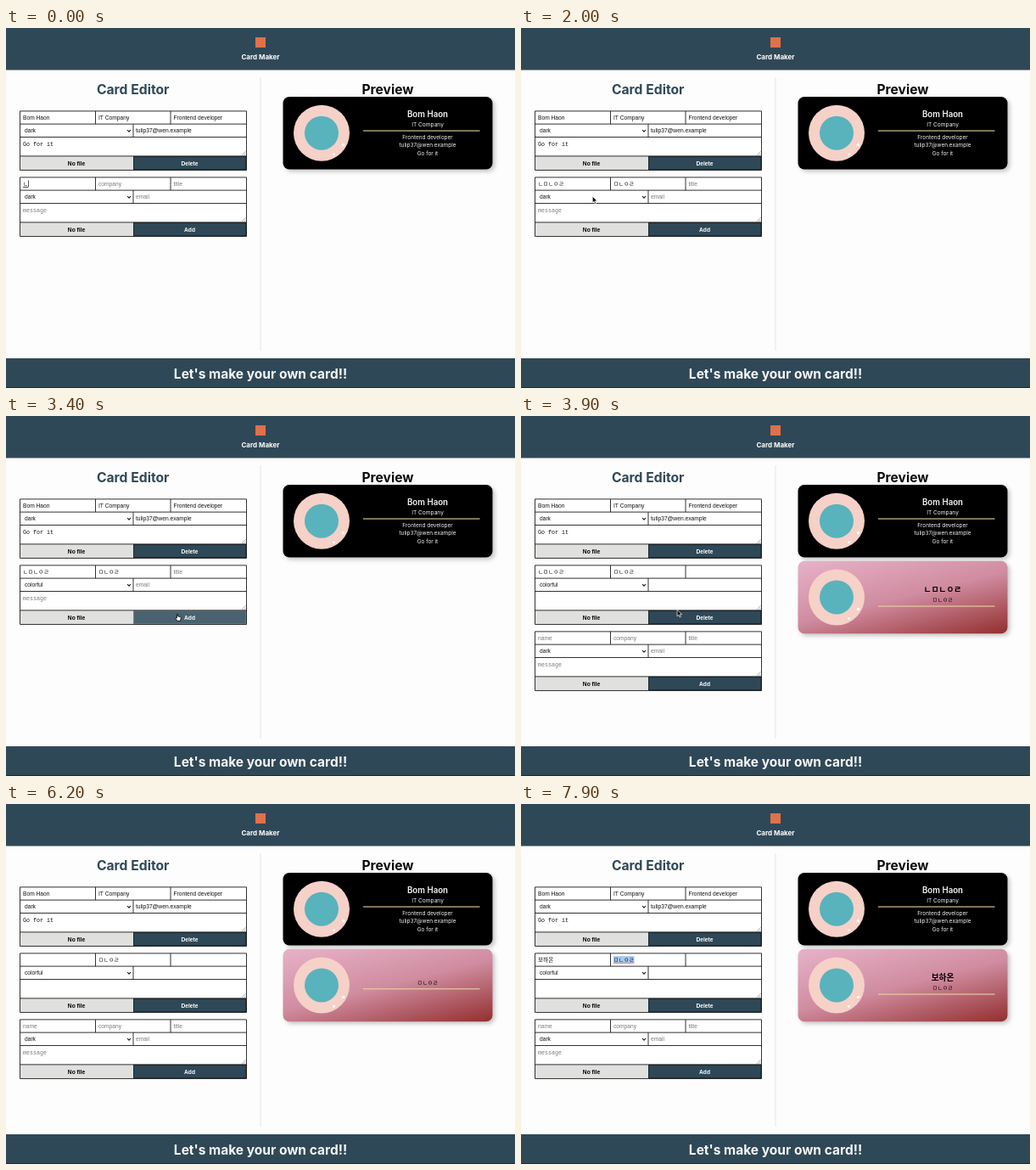
Recreate the animation shown at these times as an HTML page with a canvas. Size 600 px wide and 424 px high, loop 8 s.

```html
<!DOCTYPE html>
<html lang="en">
<head>
<meta charset="utf-8">
<title>Card Maker</title>
<style>
  html, body { margin: 0; width: 100%; height: 100%; overflow: hidden; background: #fdfdfd; }
  canvas { display: block; width: 600px; height: 424px; }
</style>
</head>
<body>
<canvas id="stage"></canvas>
<script>
const W = 600, H = 424, LOOP = 8000, STEP = 100;
const canvas = document.getElementById('stage');
const ctx = canvas.getContext('2d');
const dpr = window.devicePixelRatio || 1;
canvas.width = W * dpr;
canvas.height = H * dpr;

const NAVY = '#2f4857', INK = '#111', GOLD = '#e8d3a2', HINT = '#7a7a7a';
const UI = '"Inter", "Noto Sans CJK KR", "Noto Sans CJK", sans-serif';
const FIELD = '"Liberation Sans", "Noto Sans CJK KR", "Noto Sans CJK", sans-serif';
const MONO = '"Liberation Mono", monospace';
const FS = 6.67;
const FORM_TOP = 97.9, FORM_GAP = 78;

const OWNER = {
  name: 'Bom Haon', company: 'IT Company', title: 'Frontend developer',
  email: 'tulip37@wen.example', message: 'Go for it', theme: 'dark'
};
const HINTS = { name: 'name', company: 'company', title: 'title', email: 'email', message: 'message' };
const NAME = 'ㄴㅁㄴㅇㄹ', COMPANY = 'ㅁㄴㅇㄹ';

// Typing script: time, name, company, focused field, composing
const typing = [];
const type = (t, name, company, focus, ime) => typing.push({ t, name, company, focus, ime });
[0, 100, 300, 500, 700].forEach((t, i) => type(t, NAME.slice(0, i + 1), '', 'name', true));
type(1000, NAME, '', 'company', false);
[1200, 1400, 1500, 1700].forEach((t, i) => type(t, NAME, COMPANY.slice(0, i + 1), 'company', true));
type(1900, NAME, COMPANY, '', false);
type(4600, NAME, COMPANY, 'name', false);
[5000, 5200, 5400, 5500, 5600].forEach((t, i) => type(t, NAME.slice(0, 4 - i), COMPANY, 'name', false));
['ㅂ', '보', '봏', '보하', '보항', '보하오', '보하온'].forEach((s, i) =>
  type([6400, 6500, 6700, 6900, 7100, 7300, 7500][i], s, COMPANY, 'name', true));
type(7700, '보하온', COMPANY, 'select', false);

const MENU_OPEN = 2100, MENU_CLOSE = 2800, ADDED = 3600;

// Pointer path: [time, x, y]
const path = [
  [1900, 84, 198], [2200, 85, 199], [2600, 88.5, 221], [2900, 88.5, 221],
  [3300, 203, 237], [3700, 203, 237], [4500, 82, 181], [5000, 82, 181]
];

function pointer(t) {
  if (t < path[0][0] || t >= path[path.length - 1][0]) return null;
  const i = path.findIndex(p => p[0] > t);
  const a = path[i - 1], b = path[i];
  const k = (t - a[0]) / (b[0] - a[0]), e = k * k * (3 - 2 * k);
  return { x: a[1] + (b[1] - a[1]) * e, y: a[2] + (b[2] - a[2]) * e };
}

function rect(x, y, w, h, color) {
  ctx.fillStyle = color;
  ctx.fillRect(x, y, w, h);
}

function round(x, y, w, h, r, fill) {
  ctx.beginPath();
  ctx.roundRect(x, y, w, h, r);
  ctx.fillStyle = fill;
  ctx.fill();
}

function disc(x, y, r, color) {
  ctx.beginPath();
  ctx.arc(x, y, r, 0, 7);
  ctx.fillStyle = color;
  ctx.fill();
}

// y is the middle of the capital letters
function text(s, x, y, size, color, family = UI, weight = 400, align = 'left') {
  ctx.font = `${weight} ${size}px ${family}`;
  ctx.textAlign = align;
  ctx.fillStyle = color;
  ctx.fillText(s, x, y + size * 0.36);
}

function poly(points, fill, stroke, width = 0.8, closed = true) {
  ctx.beginPath();
  points.forEach(([x, y]) => ctx.lineTo(x, y));
  if (closed) ctx.closePath();
  if (fill) { ctx.fillStyle = fill; ctx.fill(); }
  if (stroke) { ctx.strokeStyle = stroke; ctx.lineWidth = width; ctx.stroke(); }
}

function shadow(color, blur, dx, dy) {
  ctx.shadowColor = color;
  ctx.shadowBlur = blur * dpr;
  ctx.shadowOffsetX = dx * dpr;
  ctx.shadowOffsetY = dy * dpr;
}

function page() {
  rect(0, 0, W, H, '#fdfdfd');
  rect(0, 0, W, 49.5, NAVY);
  rect(0, 389, W, 35, NAVY);
  rect(0, 423, W, 1, '#1d2c35');
  rect(294, 11, 12, 12, '#e0714a');
  text('Card Maker', 300, 34, 8, '#fff', UI, 700, 'center');
  text('Card Editor', 149.7, 72, 15.7, NAVY, UI, 700, 'center');
  text('Preview', 450, 72, 15.6, '#0a0a0a', UI, 700, 'center');
  text("Let's make your own card!!", 300, 407.5, 15.5, '#f7f7f7', UI, 700, 'center');
  rect(299.5, 58, 1, 322, '#e6e6e6');
}

function editMarks(value, x, y, edit) {
  ctx.font = `${FS}px ${FIELD}`;
  const full = ctx.measureText(value).width;
  if (edit.ime) {
    const before = ctx.measureText(value.slice(0, -1)).width;
    rect(x + before, y + 3.6, full - before, 0.8, INK);
  }
  if (edit.caret) rect(x + full, y - 4, 0.7, 8, INK);
}

function form(index, data, label, hover, edit) {
  const L = 16.5, R = 283.5, top = FORM_TOP + index * FORM_GAP;
  const rows = [0, 15.2, 30.6, 53, 69.5];
  const line = 0.9, edge = '#1c1c1c';
  rect(L, top, R - L, 69.5, '#fff');

  const field = (key, x, y, family = FIELD) => {
    const value = data[key];
    if (edit && edit.focus === 'select' && key === 'company') {
      ctx.font = `${FS}px ${FIELD}`;
      const w = ctx.measureText(value).width;
      rect(x, y - 4.2, w, 8, '#a3cbf0');
      rect(x, y + 3.6, w, 0.8, '#d9656b');
    }
    if (value) text(value, x, y, FS, INK, family);
    else if (data.hints) text(HINTS[key], x, y, FS, HINT, family);
    if (edit && edit.focus === key) editMarks(value || '', x, y, edit);
  };
  field('name', 20, top + 7.4);
  field('company', 109, top + 7.4);
  field('title', 197.5, top + 7.4);
  text(data.theme, 22, top + 23, FS, INK, FIELD);
  field('email', 153, top + 23);
  field('message', 20, top + 38.6, MONO);

  const cy = top + 23.1;
  poly([[143, cy - 1], [145, cy + 1.2], [147, cy - 1]], null, INK, 1.1, false);
  for (const d of [2.2, 4.8])
    poly([[282.6 - d, top + 52.2], [282.6, top + 52.2 - d]], null, '#888', 0.7, false);

  rect(L, top + 53, 133.5, 16.5, '#e0e0de');
  rect(150, top + 53, 133.5, 16.5, hover ? '#48636f' : NAVY);
  ctx.strokeStyle = hover ? '#7b8388' : '#1b2a32';
  ctx.lineWidth = 1;
  ctx.strokeRect(150.6, top + 53.7, 132.3, 15.1);
  text('No file', 83, top + 61.5, FS, '#000', FIELD, 700, 'center');
  text(label, 216.5, top + 61.5, FS, '#fff', FIELD, 700, 'center');

  for (const r of rows) rect(L, top + r - line / 2, R - L, line, edge);
  for (const x of [L, R]) rect(x - line / 2, top, line, 69.5, edge);
  for (const x of [105.5, 194]) rect(x - line / 2, top, line, rows[1], edge);
  rect(150 - line / 2, top + rows[1], line, rows[2] - rows[1], edge);
}

function card(top, data) {
  const x = 326.5, w = 247, h = 85.5;
  let fill = '#000', ink = '#f4f4f4';
  if (data.theme === 'colorful') {
    ink = '#000';
    fill = ctx.createLinearGradient(432.7, top - 26.6, 467.3, top + 112.1);
    fill.addColorStop(0, '#e7b2c8');
    fill.addColorStop(0.5, '#d08ca0');
    fill.addColorStop(1, '#932f2f');
  }
  ctx.save();
  shadow('rgba(0,0,0,0.22)', 5, 2.8, 2.8);
  round(x, top, w, h, 7.5, fill);
  ctx.restore();

  const cy = top + 42.7;
  disc(372, cy, 33, '#f5d1c8');
  disc(372, cy, 20, '#58b3bd');
  disc(397.5, cy + 14, 1.7, '#fff');
  disc(386.5, cy + 25, 1.3, '#fff');

  const put = (s, y, size, weight = 400) => text(s, 497, y, size, ink, UI, weight, 'center');
  const full = !!data.title;
  const lineY = top + (full ? 40 : data.name ? 53.3 : 47);
  if (data.name) put(data.name, lineY - 19, 9.7, 600);
  put(data.company, lineY - (data.name ? 7.5 : 6.8), 6.6);
  rect(421, lineY - 0.5, 137.5, 1.1, GOLD);
  if (full) {
    put(data.title, top + 48, 6.45);
    put(data.email, top + 57, 6.45);
    put(data.message, top + 66.3, 6.45);
  }
}

function menu(mouseY) {
  ctx.save();
  shadow('rgba(0,0,0,0.35)', 5, 0, 1.5);
  round(12.5, 191, 134, 37.5, 4, '#4c4e50');
  ctx.restore();
  ctx.strokeStyle = '#77797b';
  ctx.lineWidth = 0.5;
  ctx.stroke();
  const picked = mouseY < 204 ? 0 : mouseY < 215 ? 1 : 2;
  round(15, 193.2 + picked * 11, 130, 10.8, 2, '#477fe6');
  ['dark', 'light', 'colorful'].forEach((s, i) => text(s, 25, 198.7 + i * 11, 6.5, '#fff'));
  poly([[17.8, 199], [19.3, 201], [22, 196.3]], null, '#fff', 0.9, false);
}

function arrow(x, y) {
  const shape = [[0, 0], [0, 7.6], [1.8, 6], [3, 8.8], [4.3, 8.2], [3.1, 5.6], [5.5, 5.4]];
  poly(shape.map(([a, b]) => [x + a, y + b]), '#000', '#fff', 0.7);
}

function hand(x, y) {
  const shape = [[-1.6, -3.6], [-0.5, -3.6], [-0.2, -1], [2.6, -0.4], [3.2, 0.5],
    [2.6, 4.3], [-1.2, 4.3], [-3.3, 1], [-2.6, 0.4], [-1.5, 1]];
  poly(shape.map(([a, b]) => [x + a, y + b]), '#fff', '#000', 0.8);
}

function beam(x, y) {
  rect(x - 0.4, y - 3.6, 0.8, 7.2, '#222');
  rect(x - 1.6, y - 4, 3.2, 0.7, '#222');
  rect(x - 1.6, y + 3.3, 3.2, 0.7, '#222');
}

function draw(t) {
  ctx.setTransform(dpr, 0, 0, dpr, 0, 0);
  page();

  const step = typing.filter(s => s.t <= t).pop();
  const mouse = pointer(t);
  const added = t >= ADDED;
  const open = t >= MENU_OPEN && t < MENU_CLOSE;
  const overButton = mouse && mouse.x > 150 && mouse.y > 229.5;
  const edit = { focus: step.focus, ime: step.ime, caret: (t - step.t) % 1000 < 500 };
  const draft = {
    name: step.name, company: step.company, hints: !added,
    theme: t >= MENU_CLOSE ? 'colorful' : 'dark'
  };

  form(0, OWNER, 'Delete');
  form(1, draft, added ? 'Delete' : 'Add', overButton, edit);
  card(81, OWNER);
  if (added) {
    form(2, { theme: 'dark', hints: true }, 'Add');
    card(170.7, draft);
  }
  if (open) menu(mouse.y);
  if (mouse) {
    const overText = added && mouse.y < 191;
    (overText ? beam : !open && mouse.y > 230 ? hand : arrow)(mouse.x, mouse.y);
  }
}

function tick() {
  const t = performance.now() % LOOP;
  draw(Math.floor(t / STEP) * STEP);
  requestAnimationFrame(tick);
}
tick();
</script>
</body>
</html>
```
